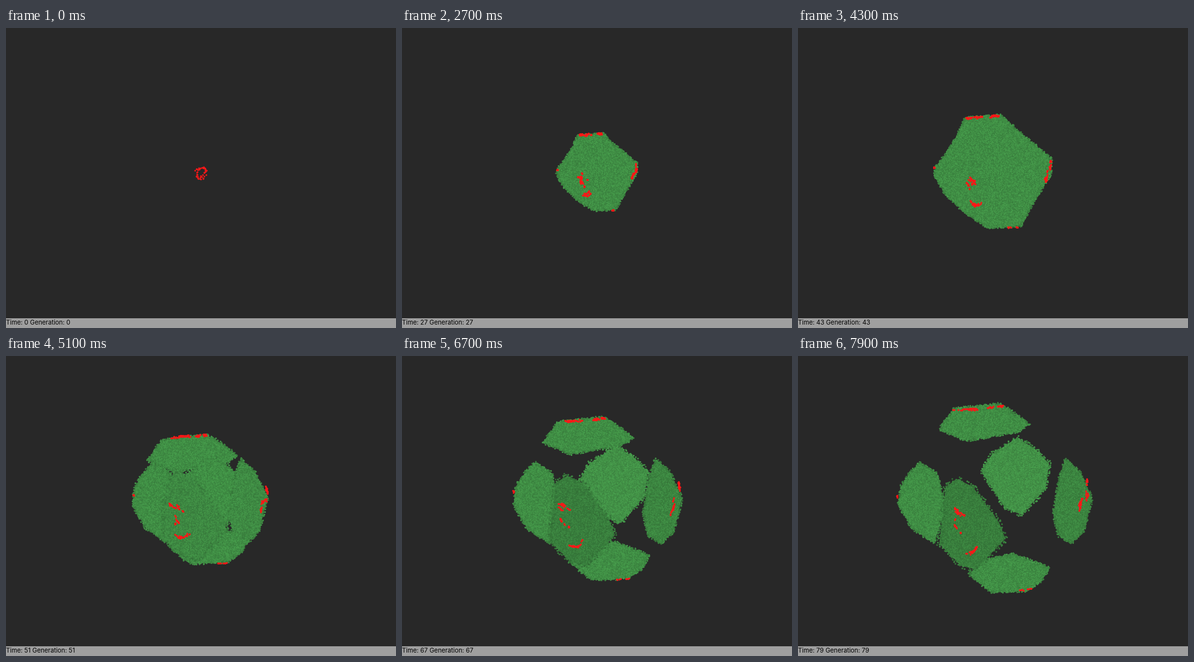
Animation of 800x616 px, one loop 8000 ms. Source, as an HTML page with a canvas:

```html
<!DOCTYPE html>
<html lang="en">
<head>
<meta charset="utf-8">
<title>Cell growth</title>
<style>
  html, body { margin: 0; width: 100%; height: 100%; overflow: hidden; background: #282828; }
  canvas { position: absolute; left: 0; top: 0; display: block; }
  #status {
    position: absolute; left: 0; top: 596px; width: 800px; height: 20px;
    background: #9f9f9f; color: #000; white-space: pre;
    font: 12.9px/17px Inter, "Liberation Sans", sans-serif;
  }
</style>
</head>
<body>
<canvas id="stage" width="800" height="596"></canvas>
<div id="status">Time: 0 Generation: 0</div>
<script>
const STEP = 100, COUNT = 80, SPLIT = 49, MID = 69, CX = 400, CY = 298;
const ctx = document.getElementById('stage').getContext('2d');
const status = document.getElementById('status');

function random(seed) {
  let a = Math.imul(seed + 1, 0x9E3779B1);
  return () => {
    a = (a + 0x6D2B79F5) | 0;
    let t = Math.imul(a ^ (a >>> 15), 1 | a);
    t = (t + Math.imul(t ^ (t >>> 7), 61 | t)) ^ t;
    return ((t ^ (t >>> 14)) >>> 0) / 4294967296;
  };
}

// The colony's radius after n generations; growth slows slightly.
const radius = n => 13 + 2.75 * n - 0.0048 * n * n;

// Hull and newborn bands are drawn around the centre for a radius of 122.
const grown = (pts, n) => pts.map((v, i) => (i % 2 ? CY : CX) + v * radius(n) / 122);
const hull = [-58,-113, 17,-119, 48,-89, 120,-29, 118,2, 76,72, 56,109, -10,112,
  -55,83, -97,44, -121,2, -116,-14, -95,-41, -73,-76];

// After the break-up each plate drifts steadily; corners are its place at MID.
const plate = (vx, vy, shade, rough, ...corners) => ({ vx, vy, shade, rough, corners });
const plates = [
  plate(0, -2.3, 0, 2.5, 320,131, 410,121, 431,131, 474,163, 452,178, 345,197, 290,173),
  plate(0.9, -1.4, 0.04, 4, 440,182, 475,203, 506,235, 499,285, 450,340, 415,325, 367,250, 388,217),
  plate(2.4, 0, -0.06, 2.5, 525,212, 554,238, 579,292, 562,360, 536,385, 510,368, 500,325, 511,255),
  plate(-1.9, 0, 0, 2.5, 269,219, 303,240, 322,310, 298,384, 253,354, 225,305, 231,267, 250,238),
  plate(0.6, 2.1, 0, 2.5, 436,386, 508,413, 495,440, 465,461, 390,464, 345,427, 375,398),
  plate(-1, 0.6, -0.11, 5, 337,247, 313,262, 300,380, 345,425, 375,432, 435,369, 422,335, 368,262)
];
const drifted = (p, n) => p.corners.map((v, i) => v + (i % 2 ? p.vy : p.vx) * (n - MID));

// Bands of newborn cells, each along a line.
const band = (count, scatter, sag, ...line) => ({ count, scatter, sag, line });
const bands = [
  band(30, 1.8, 0, -56,-113, -20,-115),
  band(24, 2, 0, -10,-116, 12,-118),
  band(20, 1.6, 0, 118,0, 117,-26),
  band(20, 2.4, 0, 106,21, 111,-3),
  band(4, 1, 0, -119,-14, -119,-4),
  band(8, 1, 0, 26,112, 50,110),
  band(24, 6, 0, -54,6, -35,18),
  band(14, 5, 0, -50,22, -42,37),
  band(26, 3, 9, -47,58, -20,57)
];

const green = v => `rgb(${70 * v | 0},${154 * v | 0},${75 * v | 0})`;

function makeTexture() {
  const size = 240, c = document.createElement('canvas'), g = c.getContext('2d'), r = random(7);
  c.width = c.height = size;
  g.fillStyle = green(0.72);
  g.fillRect(0, 0, size, size);
  for (let y = 0; y < size; y += 2)
    for (let x = 0; x < size; x += 2) {
      g.fillStyle = green(0.84 + 0.2 * r());
      g.fillRect(x + r() - 0.5, y + r() - 0.5, 2.3, 2.3);
    }
  return ctx.createPattern(c, 'repeat');
}
const texture = makeTexture();

function dot(x, y, size) {
  ctx.beginPath();
  ctx.arc(x, y, size, 0, 7);
  ctx.fill();
}

function drawMass(pts, rough, shade, seed) {
  const r = random(seed), path = new Path2D();
  const jitter = () => (r() * 2 - 1) * rough;
  for (let i = 0; i < pts.length; i += 2) path.lineTo(pts[i], pts[i + 1]);
  path.closePath();
  ctx.fillStyle = texture;
  ctx.fill(path);
  ctx.fillStyle = shade > 0 ? `rgba(120,220,120,${shade})` : `rgba(0,0,0,${-shade})`;
  ctx.fill(path);
  // Loose cells roughen the rim.
  for (let i = 0; i < pts.length; i += 2) {
    const x = pts[i], y = pts[i + 1], j = (i + 2) % pts.length;
    const dx = pts[j] - x, dy = pts[j + 1] - y, steps = Math.ceil(Math.hypot(dx, dy) / 1.5);
    for (let k = 0; k < steps; k++) {
      ctx.fillStyle = green((0.78 + 0.24 * r()) * (1 + shade));
      dot(x + dx * k / steps + jitter(), y + dy * k / steps + jitter(), 1.8);
    }
  }
}

function drawBand({ count, scatter, sag, line }, n, seed) {
  const r = random(seed), [x1, y1, x2, y2] = grown(line, n);
  const total = count * Math.min(1, 0.4 + n / 45);
  const bow = sag * 4 * radius(n) / 122;
  let t, ox, oy;
  for (let i = 0; i < total; i++) {
    // Every fourth cell starts a new clump.
    if (i % 4 === 0) {
      t = r();
      ox = (r() * 2 - 1) * scatter;
      oy = (r() * 2 - 1) * scatter;
    } else t = Math.min(1, t + 0.07);
    const x = x1 + (x2 - x1) * t + ox + r() * 2 - 1;
    const y = y1 + (y2 - y1) * t + oy + r() * 2 - 1 + bow * t * (1 - t);
    dot(Math.round(x), Math.round(y), 1.9);
  }
}

// The founding cells: a loose ring that thins out as the bands take over.
function drawFounders(n) {
  const r = random(21);
  for (let i = 0; i < 46 - n * 7; i++) {
    const a = r() * 2 * Math.PI, d = radius(n) * (1 - 0.65 * r() * r());
    dot(Math.round(CX + d * Math.cos(a)), Math.round(CY + d * Math.sin(a)), 1.7);
  }
}

function draw(n) {
  ctx.fillStyle = '#282828';
  ctx.fillRect(0, 0, 800, 596);
  if (n >= SPLIT) {
    const ramp = Math.min(1, (n - SPLIT + 2) / 12);
    plates.forEach((p, i) => drawMass(drifted(p, n), p.rough, p.shade * ramp, 1000 * i + n));
  } else if (n > 0) {
    drawMass(grown(hull, n), 2, 0, 9000 + n);
  }
  ctx.fillStyle = '#fb1818';
  drawFounders(n);
  if (n > 0) bands.forEach((b, i) => drawBand(b, n, 500 + 100 * i + (n >> 1)));
  status.textContent = `Time: ${n} Generation: ${n}`;
}

const start = performance.now();
let shown = -1;
function tick() {
  const n = Math.floor((performance.now() - start) / STEP) % COUNT;
  if (n !== shown) draw(shown = n);
  requestAnimationFrame(tick);
}
tick();
</script>
</body>
</html>
```
